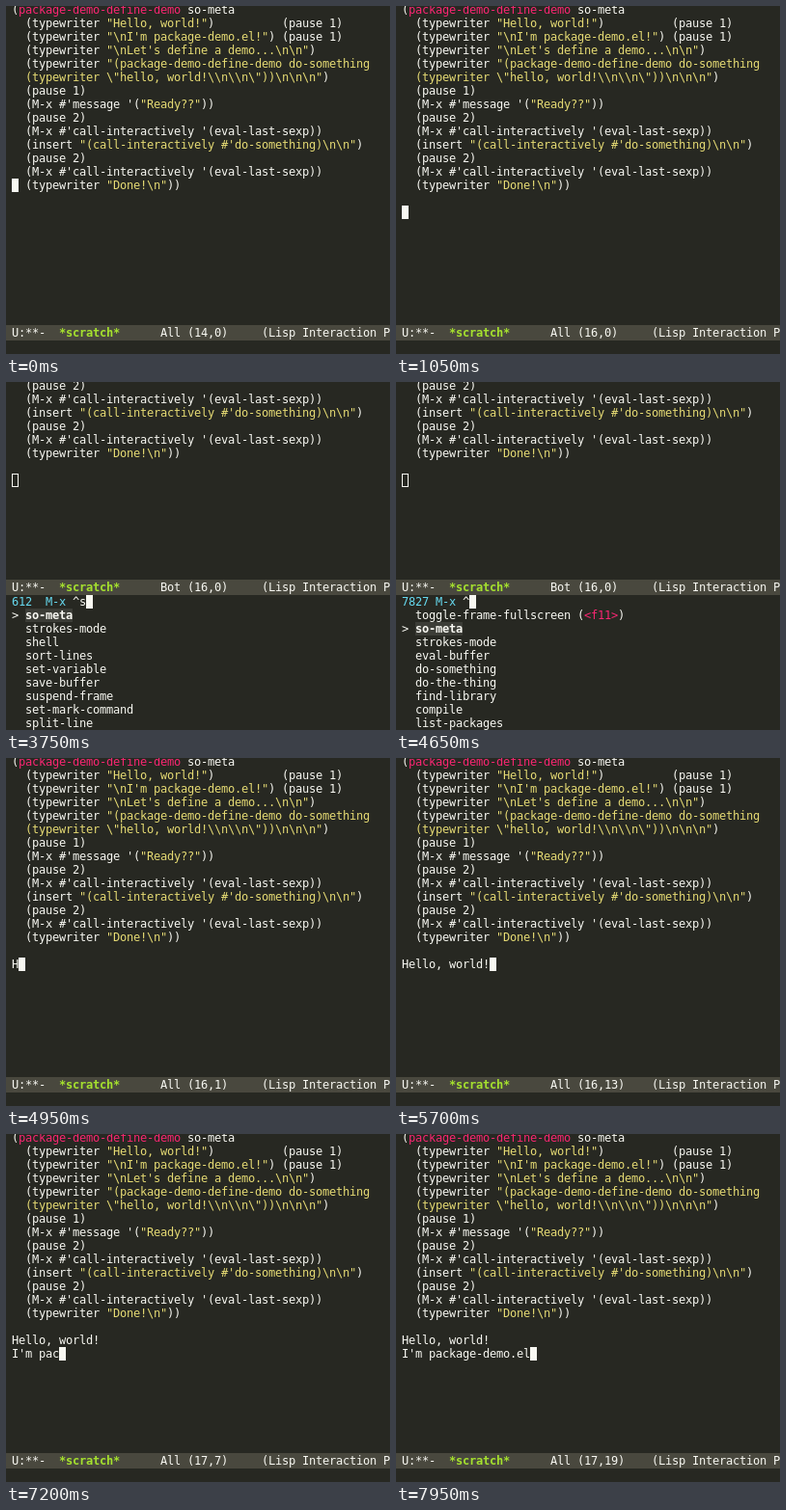
Animation of 398 by 361 pixels, one loop 8000 ms. Source, as an HTML page with a canvas:

```html
<!DOCTYPE html>
<html lang="en">
<head>
<meta charset="utf-8">
<title>Editor demo</title>
<style>
html, body { margin: 0; width: 100%; height: 100%; overflow: hidden; background: #272822; }
canvas { display: block; }
</style>
</head>
<body>
<canvas id="stage" width="398" height="361"></canvas>
<script>
const LOOP = 8000, WIDTH = 398, HEIGHT = 361;
const CELL = 7, LINE = 14, LEFT = 6, ASCENT = 11;
const COLOR = {
  back: '#272822', bar: '#49483e', select: '#3c3d37', text: '#f8f8f2',
  pink: '#f92672', yellow: '#e6db74', green: '#a6e22e', blue: '#66d9ef'
};

const SOURCE = String.raw`(package-demo-define-demo so-meta
  (typewriter "Hello, world!")          (pause 1)
  (typewriter "\nI'm package-demo.el!") (pause 1)
  (typewriter "\nLet's define a demo...\n\n")
  (typewriter "(package-demo-define-demo do-something
  (typewriter \"hello, world!\\n\\n\"))\n\n\n")
  (pause 1)
  (M-x #'message '("Ready??"))
  (pause 2)
  (M-x #'call-interactively '(eval-last-sexp))
  (insert "(call-interactively #'do-something)\n\n")
  (pause 2)
  (M-x #'call-interactively '(eval-last-sexp))
  (typewriter "Done!\n"))`;

const TYPED = ['Hello, world!', "I'm package-demo.el"];
const TYPED_ROW = 15;

const COMMANDS = ['toggle-frame-fullscreen (<f11>)', 'so-meta', 'strokes-mode', 'eval-buffer',
  'do-something', 'do-the-thing', 'find-library', 'compile', 'list-packages'];
const FILTERED = ['so-meta', 'strokes-mode', 'shell', 'sort-lines', 'set-variable',
  'save-buffer', 'suspend-frame', 'set-mark-command', 'split-line'];

// [start time, buffer row, column]
const CURSOR = [
  [0, 13, 0], [900, 14, 0], [1050, 15, 0],
  [4950, 15, 1], [5100, 15, 3], [5250, 15, 6], [5400, 15, 8], [5550, 15, 11], [5700, 15, 13],
  [6750, 16, 0], [6900, 16, 3], [7050, 16, 5], [7200, 16, 7], [7350, 16, 10],
  [7500, 16, 12], [7650, 16, 14], [7800, 16, 17], [7950, 16, 19]
];

const ctx = document.getElementById('stage').getContext('2d');
const colX = col => LEFT + col * CELL;

function rect(x, y, w, h, color) {
  ctx.fillStyle = color;
  ctx.fillRect(x, y, w, h);
}

// Draws monospaced text on the character grid.
function write(text, col, top, color = COLOR.text, bold = false) {
  ctx.font = `${bold ? 'bold ' : ''}12px "DejaVu Sans Mono", monospace`;
  ctx.fillStyle = color;
  [...text].forEach((ch, i) => {
    if (ch !== ' ') ctx.fillText(ch, colX(col + i), top + ASCENT);
  });
}

// Splits the code into single-colour runs, one line each.
function highlight(source) {
  const runs = [];
  let row = 0, col = 0;
  for (const token of source.match(/"(?:\\.|[^"\\])*"|package-demo-define-demo|[^"\n]|\n/g)) {
    const color = token[0] === '"' ? COLOR.yellow
      : token.startsWith('package') ? COLOR.pink : COLOR.text;
    token.split('\n').forEach((text, i) => {
      if (i) { row++; col = 0; }
      runs.push({ text, row, col, color });
      col += text.length;
    });
  }
  return runs;
}
const CODE = highlight(SOURCE);

function drawBuffer(scroll, row, col, focused) {
  const rowTop = r => (r - scroll) * LINE - 3;
  for (const run of CODE) {
    if (run.row >= scroll) write(run.text, run.col, rowTop(run.row), run.color);
  }
  TYPED.forEach((text, i) => {
    const line = TYPED_ROW + i;
    const count = row > line ? text.length : row === line ? col : 0;
    write(text.slice(0, count), 0, rowTop(line));
  });
  if (focused) {
    rect(colX(col), rowTop(row), CELL, LINE, COLOR.text);
  } else {
    ctx.strokeStyle = COLOR.text;
    ctx.lineWidth = 1;
    ctx.strokeRect(colX(col) + 0.5, rowTop(row) + 0.5, CELL - 1, LINE - 1);
  }
}

function drawModeLine(top, place, row, col) {
  rect(0, top, WIDTH, 16, COLOR.bar);
  write('U:**-', 0, top + 1);
  write('*scratch*', 7, top + 1, COLOR.green, true);
  write(`${place} (${row + 1},${col})`, 22, top + 1);
  write('(Lisp Interaction P', 37, top + 1);
}

function drawCommand(name, top, selected) {
  if (selected) {
    write('>', 0, top);
    rect(colX(2), top, name.length * CELL, LINE, COLOR.select);
  }
  let col = 2;
  for (const part of name.split(/(<.*>)/)) {
    write(part, col, top, part[0] === '<' ? COLOR.pink : COLOR.text, selected);
    col += part.length;
  }
}

function drawPicker(t) {
  const filtered = t >= 3750 && t < 4500;
  const list = filtered ? FILTERED : COMMANDS;
  const input = filtered ? '^s' : '^';
  const selected = t >= 4650 ? 1 : 0;
  const top = 221;
  write(filtered ? '612  M-x' : '7827 M-x', 0, top, COLOR.blue);
  write(input, 9, top);
  rect(colX(9 + input.length), top, CELL, LINE, COLOR.text);
  list.forEach((name, i) => drawCommand(name, top + (i + 1) * LINE, i === selected));
}

function draw(t) {
  const [, row, col] = CURSOR.findLast(([start]) => start <= t);
  const picking = t >= 3000 && t < 4950;
  rect(0, 0, WIDTH, HEIGHT, COLOR.back);
  drawBuffer(picking ? 8 : 0, row, col, !picking);
  drawModeLine(picking ? 205 : 331, picking ? 'Bot' : 'All', row, col);
  if (picking) drawPicker(t);
  if (t >= 150 && t < 900) write('so-meta', 0, 347);
}

const began = performance.now();
function tick() {
  draw((performance.now() - began) % LOOP);
  requestAnimationFrame(tick);
}
tick();
</script>
</body>
</html>
```
